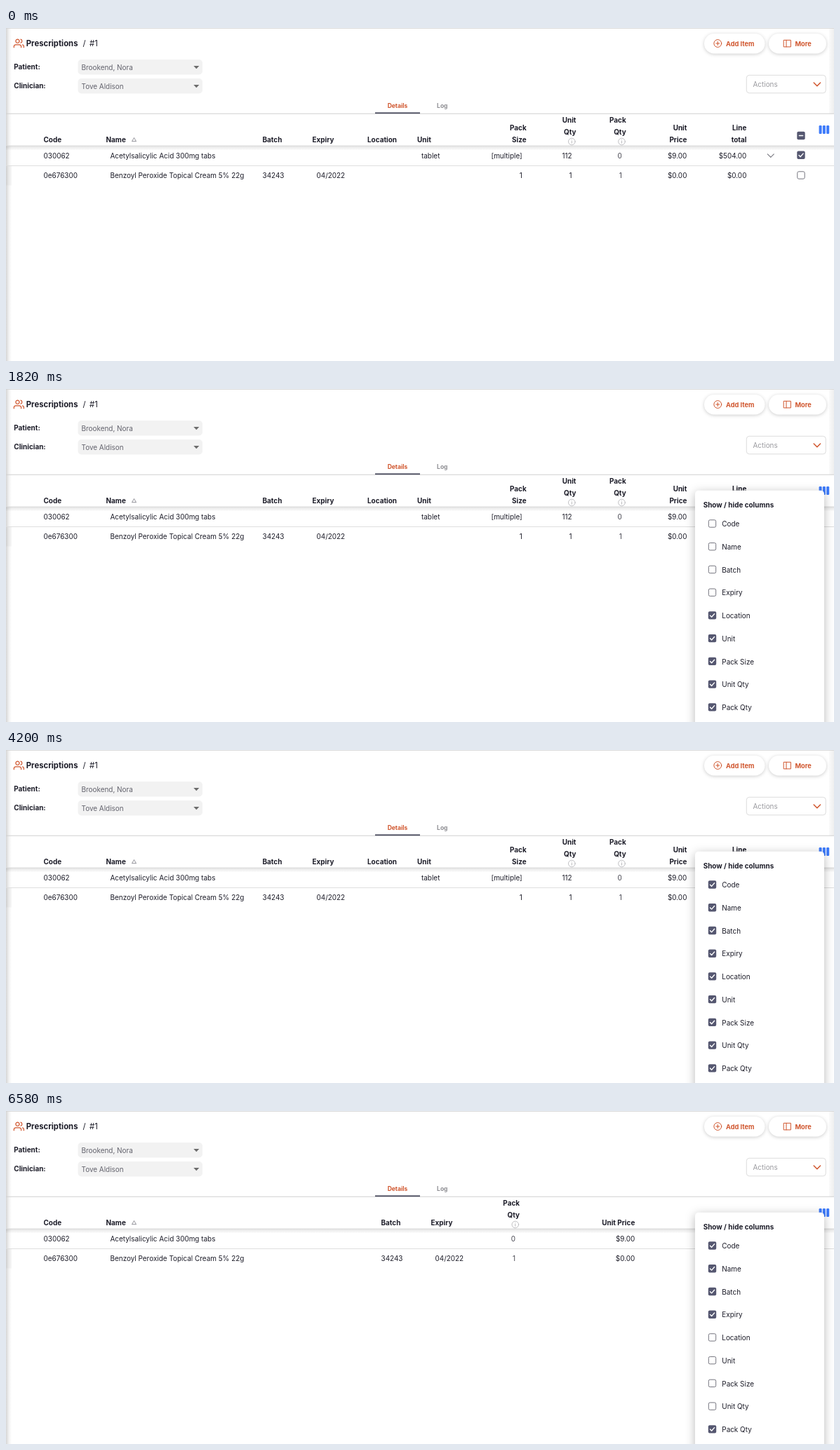
These frames come from a looping animation (1180x475 px, 8330 ms). An HTML page:

```html
<!DOCTYPE html>
<html lang="en">
<head>
<meta charset="utf-8">
<title>Prescription columns</title>
<style>
  html, body { margin: 0; width: 100%; height: 100%; overflow: hidden; background: #fff; }
  svg { display: block; width: 1180px; height: 475px; }
  text { font: 400 9.93px Inter, Roboto, sans-serif; fill: #1c1c28; white-space: pre; }
  .b { font-weight: 700; }
  .title { font-size: 11.3px; }
  .btn { font-size: 9.24px; font-weight: 700; fill: #d0562e; }
  .tab { font-size: 8.53px; font-weight: 700; }
  .field { fill: #62626c; }
  .tip { font-size: 7.82px; font-weight: 500; fill: #fff; }
  .end { text-anchor: end; }
  .mid { text-anchor: middle; }
  .soft { fill: #44444e; }
  .line { fill: none; stroke-linecap: round; stroke-linejoin: round; }
  .pill { fill: #fff; filter: drop-shadow(0 1.5px 2.5px rgba(0, 0, 0, .2)); }
  .paper { fill: #fff; filter: drop-shadow(0 3px 7px rgba(0, 0, 0, .28)); }
</style>
</head>
<body>
<svg viewBox="0 0 1180 475">
  <defs>
    <linearGradient id="left"><stop offset="0" stop-color="#d6d6d6"/><stop offset=".5" stop-color="#f1f1f1"/><stop offset="1" stop-color="#fff"/></linearGradient>
    <linearGradient id="right"><stop offset="0" stop-color="#fafafa"/><stop offset="1" stop-color="#eee"/></linearGradient>
    <linearGradient id="down" x2="0" y2="1"><stop offset="0" stop-opacity=".1"/><stop offset="1" stop-opacity="0"/></linearGradient>
  </defs>
  <g id="base"></g>
  <g id="table"></g>
  <g id="tip"></g>
  <g id="menu"></g>
</svg>
<script>
const LOOP = 8330, STEP = 70;
const ORANGE = '#d0562e', DARK = '#555770';
const $ = id => document.getElementById(id);

const text = (x, y, s, cls = '') => `<text x="${x}" y="${y}" class="${cls}">${s}</text>`;
const rect = (x, y, w, h, r, attrs) => `<rect x="${x}" y="${y}" width="${w}" height="${h}" rx="${r}" ${attrs}/>`;
const path = (d, color, width = 1) => `<path class="line" d="${d}" stroke="${color}" stroke-width="${width}"/>`;
const ring = (x, y, r, color, width = 1) => `<circle class="line" cx="${x}" cy="${y}" r="${r}" stroke="${color}" stroke-width="${width}"/>`;

function checkbox(x, y, state) {
  if (!state) return rect(x - 5.2, y - 5.2, 10.4, 10.4, 2, 'fill="#fff" stroke="#74747e"');
  const mark = state === 'some' ? `M${x - 2.6} ${y}h5.2` : `M${x - 3} ${y + .2}l2.1 2.2 4-4.6`;
  return rect(x - 5.7, y - 5.7, 11.4, 11.4, 2, `fill="${DARK}"`) + path(mark, '#fff', 1.4);
}

function field(y, label, value) {
  return text(11.3, y + 14.3, label, 'b') +
    rect(102.5, y, 177.5, 21.5, 5, 'fill="#f2f2f2"') +
    text(107.5, y + 15.3, value, 'field') +
    `<path d="M267.3 ${y + 9}h8l-4 4.2z" fill="#6c6c6c"/>`;
}

function drawBase() {
  const users = `<g transform="translate(10.7 14.2) scale(.64)">` +
    path('M17 21v-2a4 4 0 0 0-4-4H5a4 4 0 0 0-4 4v2M23 21v-2a4 4 0 0 0-3-3.87M16 3.13a4 4 0 0 1 0 7.75', ORANGE, 1.9) +
    ring(9, 7, 4, ORANGE, 1.9) + '</g>';
  const bars = [1158.6, 1163.9, 1169.2].map(x => rect(x, 139, 4, 12, 1.2, 'fill="#3e7bfa"')).join('');
  return rect(0, 0, 8, 475, 0, 'fill="url(#left)"') +
    rect(0, 196, 8, 28.5, 0, 'fill="#000" fill-opacity=".03"') +
    rect(1173, 0, 7, 122, 0, 'fill="url(#right)"') +
    rect(0, 0, 1180, .8, 0, 'fill="#d4d4d4"') +
    users + text(28.8, 25.6, 'Prescriptions', 'title b') + text(109.5, 25.6, '/', 'title') + text(119, 25.6, '#1', 'title') +
    field(45, 'Patient:', 'Brookend, Nora') + field(72, 'Clinician:', 'Tove Aldison') +
    rect(995, 8, 86.5, 28.5, 14.2, 'class="pill"') + ring(1014.3, 22, 5.4, ORANGE) +
    path('M1011.8 22h5M1014.3 19.5v5', ORANGE) + text(1026, 25.5, 'Add Item', 'btn') +
    rect(1087, 8, 82, 28.5, 14.2, 'class="pill"') +
    path('M1108.6 17.3h9.8v9.6h-9.8zM1112 17.3v9.6', ORANGE) + text(1124.5, 25.5, 'More', 'btn') +
    rect(1055.3, 67.3, 113, 25.5, 4, 'fill="#fff" stroke="#dcdcdc"') +
    text(1064.5, 83.8, 'Actions', '" style="fill:#9a9a9f') +
    path('M1151.2 78l4.7 4.7 4.7-4.7', ORANGE, 1.5) +
    text(558, 114, 'Details', 'tab mid" style="fill:' + ORANGE) + text(621.8, 114, 'Log', 'tab mid" style="fill:#8f8f94') +
    rect(0, 121.7, 1180, 1, 0, 'fill="#cfcfcf"') + rect(526, 120.4, 64, 1.7, 0, 'fill="#45475a"') +
    rect(0, 167.6, 1180, 1, 0, 'fill="#d8d8d8"') + rect(0, 168.6, 1180, 6, 0, 'fill="url(#down)"') +
    rect(0, 196, 1180, 1, 0, 'fill="#dedede"') +
    path('M1085.3 179.8l4.5 4.5 4.5-4.5', '#77777f', 1.1) +
    checkbox(1133, 153.5, 'some') + checkbox(1133, 181.3, true) + checkbox(1133, 210, false) + bars;
}

// label, width, header offset, value offset, row values; "end" columns align right
const COLUMNS = [
  { name: 'Code', w: 89, cells: ['030062', '0e676300'] },
  { name: 'Name', pad: 6, cells: ['Acetylsalicylic Acid 300mg tabs', 'Benzoyl Peroxide Topical Cream 5% 22g'] },
  { name: 'Batch', w: 71, cells: ['', '34243'] },
  { name: 'Expiry', w: 78.5, pad: 6, cells: ['', '04/2022'] },
  { name: 'Location', w: 71, cells: ['', ''] },
  { name: 'Unit', w: 89.5, pad: 6, cells: ['tablet', ''] },
  { name: 'Pack Size', w: 89, end: 66.2, pad: -6, cells: ['[multiple]', '1'] },
  { name: 'Unit Qty', w: 71.2, end: 48, pad: -6, info: true, cells: ['112', '1'] },
  { name: 'Pack Qty', w: 71.2, end: 48, pad: -6, info: true, soft: true, cells: ['0', '1'] }
];
const NAMES = COLUMNS.map(c => c.name);

// time, width of the Name column, hidden columns
const LAYOUTS = [
  [0, 223, []],
  [2240, 347, ['Code', 'Batch', 'Expiry']],
  [2800, 308, ['Code', 'Expiry']],
  [3500, 265, ['Code']],
  [4200, 223, []],
  [5180, 256, ['Location']],
  [5600, 304, ['Location', 'Unit']],
  [6090, 353, ['Location', 'Unit', 'Pack Size']],
  [6580, 392, ['Location', 'Unit', 'Pack Size', 'Unit Qty']]
];

// time, column whose box flips
const TOGGLES = [
  [2240, 'Name'], [2800, 'Batch'], [3430, 'Expiry'], [4130, 'Code'],
  [5110, 'Location'], [5530, 'Unit'], [6020, 'Pack Size'], [6580, 'Unit Qty']
];

const stacked = (x, label, low, high) => {
  const [a, b] = label.split(' ');
  return text(x, high, a, 'b end') + text(x, low, b, 'b end');
};
const cells = (x, values, cls) => text(x, 185.7, values[0], cls) + text(x, 214.2, values[1], cls);

function drawTable([, nameWidth, hidden]) {
  let x = 53.5, out = '';
  for (const c of COLUMNS) {
    if (hidden.includes(c.name)) continue;
    const at = x + (c.end || 0), pad = c.pad || 0;
    if (c.info) {
      out += stacked(at, c.name, 151.6, 134.6) + ring(at - 6.2, 162, 4.8, '#b0b0b4', .8) +
        path(`M${at - 6.2} 161.4v2.8M${at - 6.2} 159.6v.1`, '#b0b0b4', .9);
    } else if (c.end) {
      out += stacked(at, c.name, 163, 145.8);
    } else {
      out += text(at, 163, c.name, 'b');
    }
    if (c.name === 'Name') out += path(`M${x + 37.4} 161.7h5.6l-2.8-4.8z`, '#77777f', .8);
    out += cells(at + pad, c.cells, (c.end ? 'end' : '') + (c.soft ? ' soft' : ''));
    x += c.w || nameWidth;
  }
  const narrow = nameWidth < 250;
  const price = x + (narrow ? 63.5 : 86.5 + .43 * (nameWidth - 265));
  out += narrow ? stacked(price, 'Unit Price', 163, 145.8) : text(price, 163, 'Unit Price', 'b end');
  out += cells(price, ['$9.00', '$0.00'], 'end');
  if (narrow) {
    out += stacked(price + 85, 'Line total', 163, 145.8) + cells(price + 85, ['$504.00', '$0.00'], 'end');
  }
  return out;
}

// cubic-bezier(.4, 0, .2, 1)
function ease(p) {
  if (p <= 0) return 0;
  if (p >= 1) return 1;
  let lo = 0, hi = 1;
  for (let i = 0; i < 20; i++) {
    const s = (lo + hi) / 2, r = 1 - s;
    if (1.2 * r * r * s + .6 * r * s * s + s * s * s < p) lo = s; else hi = s;
  }
  return lo * lo * (3 - 2 * lo);
}
const ramp = (t, start, length) => ease((t - start) / length);

function grow(k, alpha, x, y, inner) {
  const sx = .75 + .25 * k, sy = .5625 + .4375 * k;
  return `<g opacity="${alpha}" transform="translate(${x} ${y}) scale(${sx} ${sy}) translate(${-x} ${-y})">${inner}</g>`;
}

function drawTip(t) {
  const leave = 1 - ramp(t, 1320, 150);
  const hover = ramp(t, 950, 150) * leave;
  if (!hover) return '';
  const box = rect(1090, 169.7, 88.5, 18.6, 3, 'fill="#616161" fill-opacity=".92"') + text(1134.2, 181.6, 'Show / hide columns', 'tip mid');
  return `<circle cx="1166" cy="145" r="14" fill="#000" opacity="${.09 * hover}"/>` +
    grow(ramp(t, 990, 133), ramp(t, 990, 200) * leave, 1134, 169.7, box);
}

function drawMenu(t) {
  const alpha = ramp(t, 1260, 347);
  if (!alpha) return '';
  const off = new Set(NAMES.slice(0, 4));
  for (const [at, name] of TOGGLES) {
    if (t >= at && !off.delete(name)) off.add(name);
  }
  const items = NAMES.map((name, i) => {
    const y = 192 + 32.73 * i;
    return checkbox(1006.5, y, !off.has(name)) + text(1020.3, y + 4.3, name);
  }).join('');
  const inner = rect(982, 144.7, 184, 400, 5, 'class="paper"') + text(993.7, 168.6, 'Show / hide columns', 'b') + items;
  return grow(ramp(t, 1260, 231), alpha, 1166, 145, inner);
}

let shownStep = -1, shownLayout;
function render(ms) {
  const t = Math.floor((ms % LOOP) / STEP) * STEP;
  if (t === shownStep) return;
  shownStep = t;
  const layout = LAYOUTS.filter(l => l[0] <= t).pop();
  if (layout !== shownLayout) {
    shownLayout = layout;
    $('table').innerHTML = drawTable(layout);
  }
  $('tip').innerHTML = drawTip(t);
  $('menu').innerHTML = drawMenu(t);
}

$('base').innerHTML = drawBase();
const start = performance.now();
function tick() {
  render(performance.now() - start);
  requestAnimationFrame(tick);
}
tick();
</script>
</body>
</html>
```
